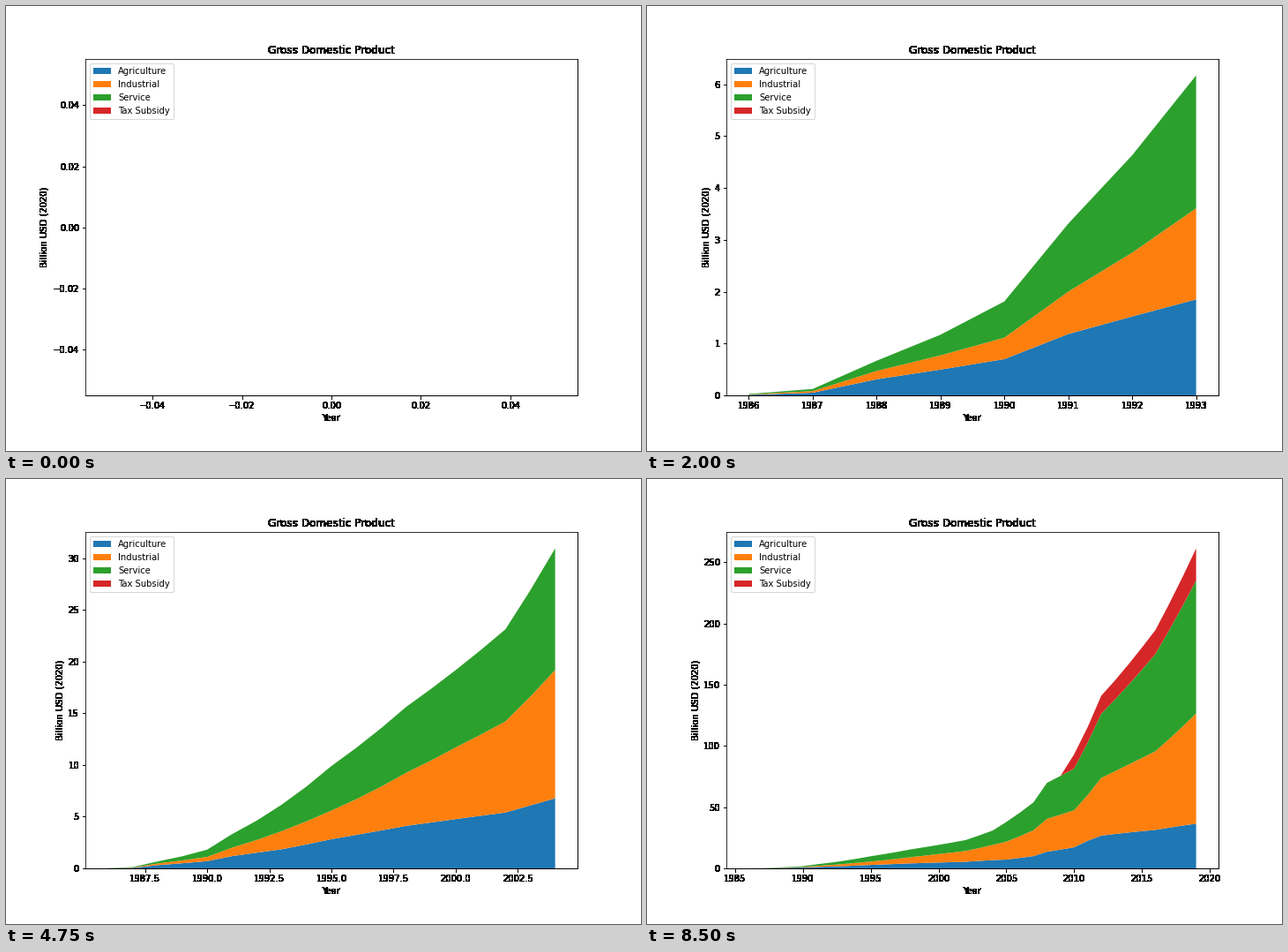
Write a matplotlib script that moves like this. It is 720x504 px and loops after 8750 ms.

```python
import matplotlib.pyplot as plt
import numpy as np
from matplotlib.animation import FuncAnimation

YEARS = np.arange(1986, 2020)
LABELS = ["Agriculture", "Industrial", "Service", "Tax Subsidy"]
TAX_START = 2010


def trend(**keys):
    """Straight-line path through key years given as y1986=value."""
    return np.interp(YEARS, [int(k[1:]) for k in keys], list(keys.values()))


# Output before tax grows roughly with the square of time.
root = trend(y1986=0.164, y1987=0.351, y1988=0.817, y1990=1.346, y1991=1.82,
             y1995=3.148, y1998=3.952, y2002=4.81, y2004=5.565, y2007=7.342,
             y2008=8.36, y2010=9.03, y2012=11.24, y2016=13.24, y2019=15.34)
output = root ** 2

# Shares of output: agriculture alone, then agriculture plus industry.
farm = trend(y1986=0.37, y1988=0.464, y1990=0.386, y1993=0.30, y2004=0.219,
             y2005=0.19, y2007=0.186, y2011=0.22, y2019=0.155)
goods = trend(y1986=0.64, y1988=0.705, y1990=0.614, y1995=0.565, y2000=0.61,
              y2004=0.62, y2005=0.575, y2012=0.585, y2016=0.546, y2019=0.538)

# Tax settles from 14% towards 11% of output.
since = np.maximum(YEARS - TAX_START, 0)
tax = np.where(YEARS >= TAX_START, 0.111 + 0.032 * 0.4 ** since, 0)

LAYERS = output * np.array([farm, goods - farm, 1 - goods, tax])

fig, ax = plt.subplots(figsize=(10, 7), dpi=72, facecolor="white")
fig.subplots_adjust(left=0.125, right=0.9, bottom=0.125, top=0.88)


def solid(img, dpi):
    """Drop soft alpha so text and lines outside the plot get hard edges."""
    out = np.rint(img * 255).astype(np.uint8)
    out[..., 3] = np.where(out[..., 3] > 0, 255, 0)
    return out, 0, 0


def update(n):
    ax.clear()
    ax.set_agg_filter(solid)
    ax.stackplot(YEARS[:n], LAYERS[:, :n], labels=LABELS,
                 colors=["C0", "C1", "C2", "C3"])
    ax.set(title="Gross Domestic Product", xlabel="Year",
           ylabel="Billion USD (2020)")
    ax.legend(loc="upper left")


anim = FuncAnimation(fig, update, frames=len(YEARS) + 1, interval=250,
                     repeat=True, repeat_delay=0)
plt.show()
```
